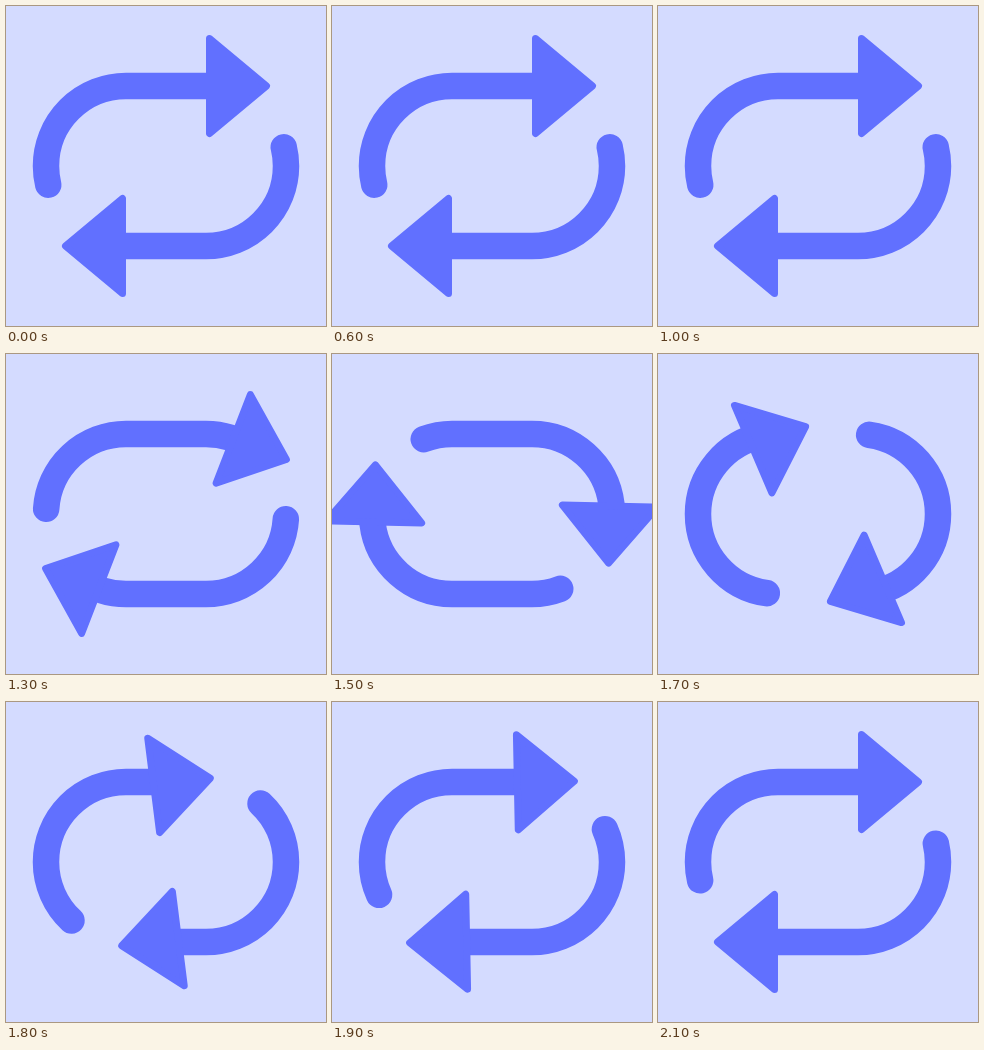
An HTML page for the animation above (3100 ms loop, 320 by 320 pixels).

```html
<!DOCTYPE html>
<html lang="en">
<head>
<meta charset="utf-8">
<title>Repeat arrows</title>
<style>
  html, body { margin: 0; width: 100%; height: 100%; overflow: hidden; background: #d4dbff; }
  svg { display: block; width: 100%; height: 100%; }
  .line { fill: none; stroke: #6170ff; stroke-width: 26.5; stroke-linecap: round; stroke-dasharray: 224.8 900; }
  .head { fill: #6170ff; stroke: #6170ff; stroke-width: 7; stroke-linejoin: round; }
</style>
</head>
<body>
<svg viewBox="0 0 320 320">
  <defs>
    <g id="arrow">
      <path class="line" d="M120 240A80 80 0 0 1 120 80H200A80 80 0 0 1 200 240H120"/>
      <path class="head" d="M3.5-47.5 60.5 0 3.5 47.5Z"/>
    </g>
  </defs>
  <use href="#arrow"/>
  <use href="#arrow" transform="rotate(180 160 160)"/>
</svg>
<script>
  const LOOP = 3100, STEP = 100, START = 1100, MOVE = 965;
  const TAIL = 106.5, TRAVEL = 80 + 80 * Math.PI;

  // Head route: down the right side, then round to the other arrow's place
  const BEND = 0.35;
  const down = [[200, 80], [240, 80], [273, 109], [278, 149]];
  const round = [[278, 149], [300, 214], [205, 240], [120, 240]];

  const line = document.querySelector('.line');
  const head = document.querySelector('.head');

  const clamp = t => Math.max(0, Math.min(1, t));
  const mix = (a, b, k) => a + (b - a) * k;
  const smooth = t => t * t * (3 - 2 * t);
  const smoother = t => t * t * t * (10 - 15 * t + 6 * t * t);
  const ease = t => mix(smoother(t), smooth(t), 0.2);

  // Point on a Bezier curve, by repeated halving of the control polygon
  function bezier(points, u) {
    if (points.length === 1) return points[0];
    const next = points.slice(1).map(([x, y], i) =>
      [mix(points[i][0], x, u), mix(points[i][1], y, u)]);
    return bezier(next, u);
  }

  function draw(now) {
    const held = Math.floor(now % LOOP / STEP) * STEP;
    const p = ease(clamp((held - START) / MOVE));
    const [x, y] = p < BEND
      ? bezier(down, p / BEND)
      : bezier(round, (p - BEND) / (1 - BEND));
    const angle = 180 * (1 - (1 - p) ** 1.65);
    line.style.strokeDashoffset = -(TAIL + TRAVEL * p);
    head.setAttribute('transform', `translate(${x} ${y}) rotate(${angle})`);
  }

  const begin = performance.now();
  function tick() {
    draw(performance.now() - begin);
    requestAnimationFrame(tick);
  }
  tick();
</script>
</body>
</html>
```
